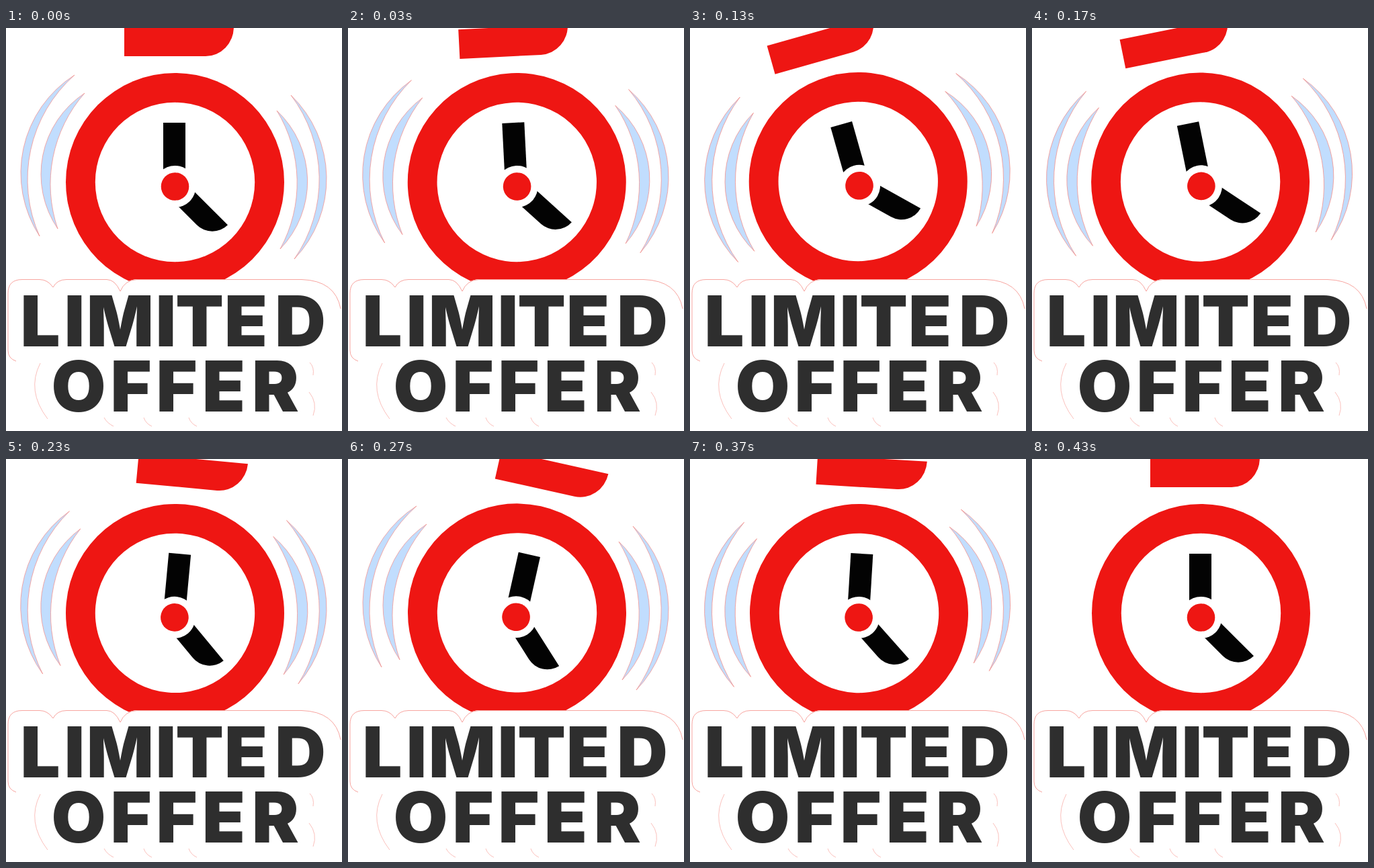
These frames come from a looping animation (500 by 600 pixels, 1.01 s). An HTML page:

```html
<!DOCTYPE html>
<html lang="en">
<head>
<meta charset="utf-8">
<title>Limited offer</title>
<style>
html, body { margin: 0; width: 100%; height: 100%; overflow: hidden; background: #fff; }
svg { display: block; width: 500px; height: 600px; }
text { font: 900 104.5px Inter, "Open Sans", sans-serif; text-anchor: middle; fill: #2e2e2e; }
.red { fill: #ee1613; }
.wave { fill: #c1ddfe; stroke: #f58a84; stroke-width: .7; }
.edge { fill: none; stroke: #f8a5a0; stroke-width: 1; }
.faint { opacity: .7; }
</style>
</head>
<body>
<svg viewBox="0 0 500 600">
  <g id="waves"></g>
  <g id="clock">
    <path class="red" d="M176-1.8H339A42 43.8 0 0 1 297 42H176z"/>
    <circle class="red" cx="251.5" cy="229.5" r="162.5"/>
    <circle cx="251.5" cy="229.5" r="118.7" fill="#fff"/>
    <g transform="translate(251.5 236)">
      <path d="M-17.5-95H15.5V0H-17.5z" fill="#030303"/>
      <path d="M0-15H96A32.5 32.5 0 0 1 63.5 17.5H0z" fill="#030303" transform="rotate(45)"/>
      <circle r="31" fill="#fff"/>
      <circle class="red" r="20.8"/>
    </g>
  </g>
  <!-- plate behind the lettering -->
  <path fill="#fff" d="M3 395Q3 374 24 374H50Q62 374 70 386Q76 374 90 374H150Q162 374 170 392Q177 374 196 374H440Q498 376 498 430V600H3z"/>
  <path class="edge" d="M15 496Q3 492 3 480V395Q3 374.5 24 374.5H50Q62 374.5 70 386Q76 374.5 90 374.5H150Q162 374.5 170 392Q177 374.5 196 374.5H440Q490 376 498 418"/>
  <path class="edge faint" d="M51 499Q30 540 62 582M452 498Q459 505 457 517M451 542Q464 558 457 577M146 580Q150 588 160 593M205 580Q208 589 217 593M272 580Q275 589 284 593"/>
  <text id="top" y="474"></text>
  <text id="bottom" y="571"></text>
</svg>
<script>
const $ = id => document.getElementById(id);
const LOOP = 1010, FPS = 30, LAST = 13;

function letter(id, word, centers) {
  $(id).textContent = word;
  $(id).setAttribute("x", centers.join(" "));
}
letter("top", "LIMITED", [51, 102, 170, 238, 288, 357, 438]);
letter("bottom", "OFFER", [108, 186, 254, 324, 401]);

// A crescent between two tips, bulging left (0) or right (1).
function crescent(x1, y1, x2, y2, outer, inner, side) {
  const path = document.createElementNS("http://www.w3.org/2000/svg", "path");
  path.setAttribute("class", "wave");
  path.setAttribute("d", `M${x1} ${y1}A${outer} ${outer} 0 0 ${side} ${x2} ${y2}` +
    `A${inner} ${inner} 0 0 ${1 - side} ${x1} ${y1}z`);
  $("waves").append(path);
}
crescent(102, 70, 50, 310, 172.7, 207.7, 0);
crescent(117, 97, 77, 299, 144.6, 205.8, 0);
crescent(403, 123, 408, 329, 144.6, 205.8, 1);
crescent(424, 100, 429, 344, 172.7, 207.7, 1);

// Clock swing: [ms, degrees], eased between keys.
const SWING = [[0, 0], [120, -16.2], [307, 16.2], [393, 0]];
function swing(ms) {
  for (let i = 1; i < SWING.length; i++) {
    const [t0, a0] = SWING[i - 1], [t1, a1] = SWING[i];
    if (ms < t1) return a0 + (a1 - a0) * (1 - Math.cos(Math.PI * (ms - t0) / (t1 - t0))) / 2;
  }
  return 0;
}

function draw(ms) {
  // Steps start at 0, 30, 70, 100, 130, 170 ...
  const step = Math.min(LAST, Math.floor((ms + 3.4) * FPS / 1000));
  const angle = swing(step * 1000 / FPS);
  const dx = Math.min(0, angle * .08), dy = -.004 * angle * angle;
  $("clock").setAttribute("transform", `translate(${dx} ${dy}) rotate(${angle} 251.5 229.5)`);

  const sway = -2.9 * (4 - Math.abs(4 - step % 8));
  $("waves").setAttribute("transform", `rotate(${sway} 250.5 223)`);
  $("waves").setAttribute("visibility", step < LAST ? "visible" : "hidden");
}

const start = performance.now();
function tick() {
  draw((performance.now() - start) % LOOP);
  requestAnimationFrame(tick);
}
draw(0);
tick();
</script>
</body>
</html>
```
